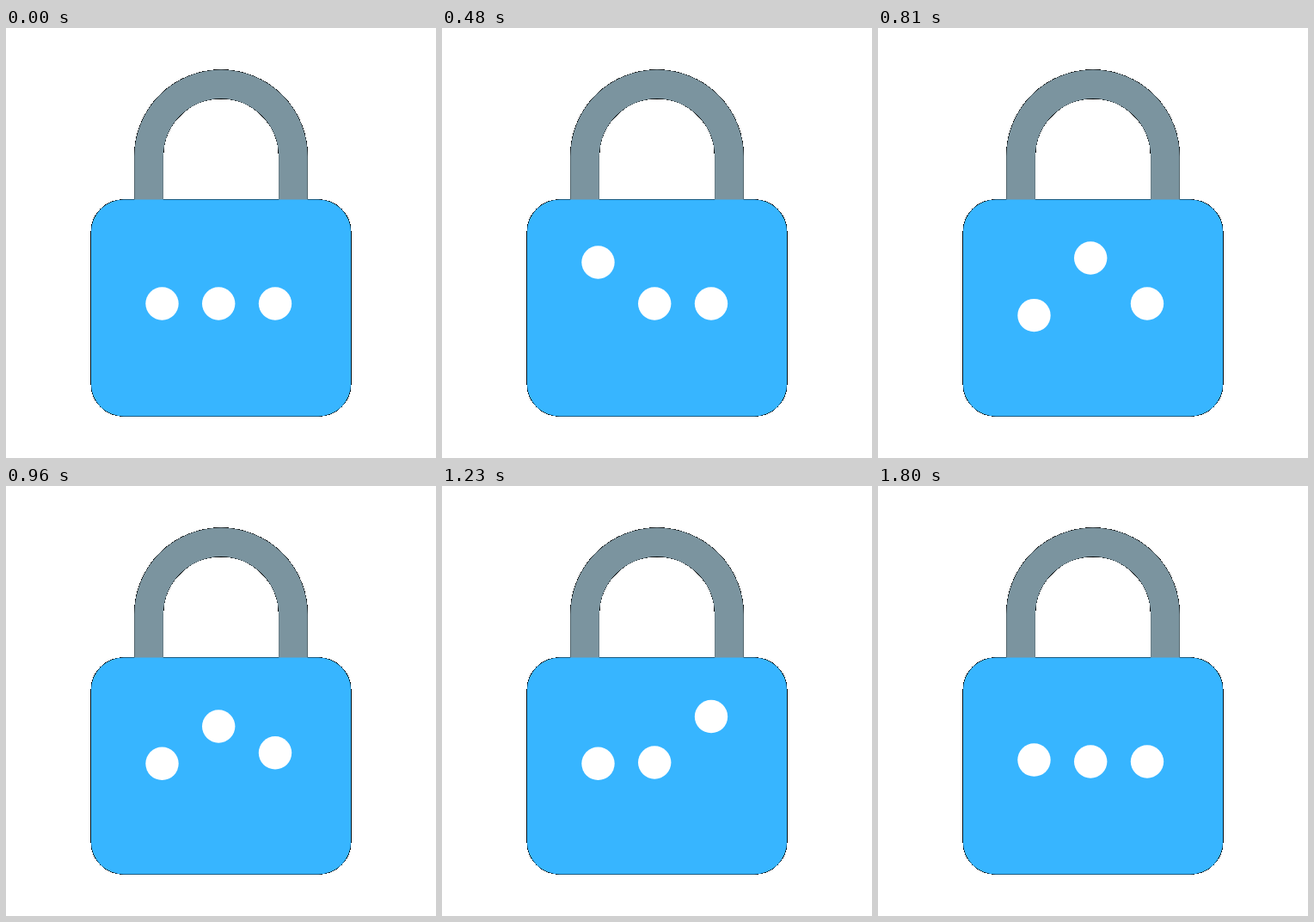
Recreate the animation shown at these times as an HTML page. Size 500 by 500 pixels, loop 1.83 s.

```html
<!DOCTYPE html>
<html lang="en">
<head>
<meta charset="utf-8">
<title>Lock</title>
<style>
  html, body { margin: 0; width: 100%; height: 100%; overflow: hidden; background: #fff; }
  svg { display: block; width: 100vw; height: 100vh; }
  .edge { fill: none; stroke: #000; stroke-width: 1; shape-rendering: crispEdges; }
</style>
</head>
<body>
<svg viewBox="0 0 500 500">
  <defs>
    <path id="shackle" d="M149.3 210V149.26A100.7 100.7 0 0 1 350.7 149.26V210H317.16V149.26A67.16 67.16 0 0 0 182.84 149.26V210Z"/>
    <rect id="body" x="98.9" y="199.6" width="302.2" height="251.85" rx="37.8"/>
  </defs>
  <!-- Hard black rims sit below the smooth fills, so only the soft edge pixels darken. -->
  <use href="#shackle" class="edge"/>
  <use href="#body" class="edge"/>
  <use href="#shackle" fill="#7b949f"/>
  <use href="#body" fill="#37b5ff"/>
  <g id="dots" fill="#fff"></g>
</svg>
<script>
const LOOP = 1830, STEP = 30, START = 300, CYCLE = 1470, REST_Y = 320.5;

// Each dot hops up, dips below its line, then settles.
const dots = [
  { x: 181.5, delay: 0,   rise: 64, dip: 16, settle: 2.3 },
  { x: 247.2, delay: 300, rise: 60, dip: 16, settle: 1 },
  { x: 313,   delay: 590, rise: 65, dip: 15, settle: 0 }
];

const group = document.getElementById("dots");
for (const dot of dots) {
  dot.node = document.createElementNS("http://www.w3.org/2000/svg", "circle");
  dot.node.setAttribute("cx", dot.x);
  dot.node.setAttribute("r", 19.2);
  group.append(dot.node);
}

const ease = (a, b, u) => a + (b - a) * (1 - Math.cos(Math.PI * u)) / 2;

function lift({ rise, dip, settle }, t) {
  if (t <= 0) return 0;
  if (t < 270) return ease(0, rise, t / 270);
  if (t < 540) return ease(rise, -dip, (t - 270) / 270);
  if (t < 630) return ease(-dip, -settle, (t - 540) / 90);
  return -settle;
}

function draw(now) {
  const time = Math.floor((now % LOOP) / STEP + 1e-6) * STEP;
  const local = time % CYCLE - START;
  for (const dot of dots) {
    dot.node.setAttribute("cy", REST_Y - lift(dot, local - dot.delay));
  }
}

const begin = performance.now();
function tick() {
  draw(performance.now() - begin);
  requestAnimationFrame(tick);
}
tick();
</script>
</body>
</html>
```
